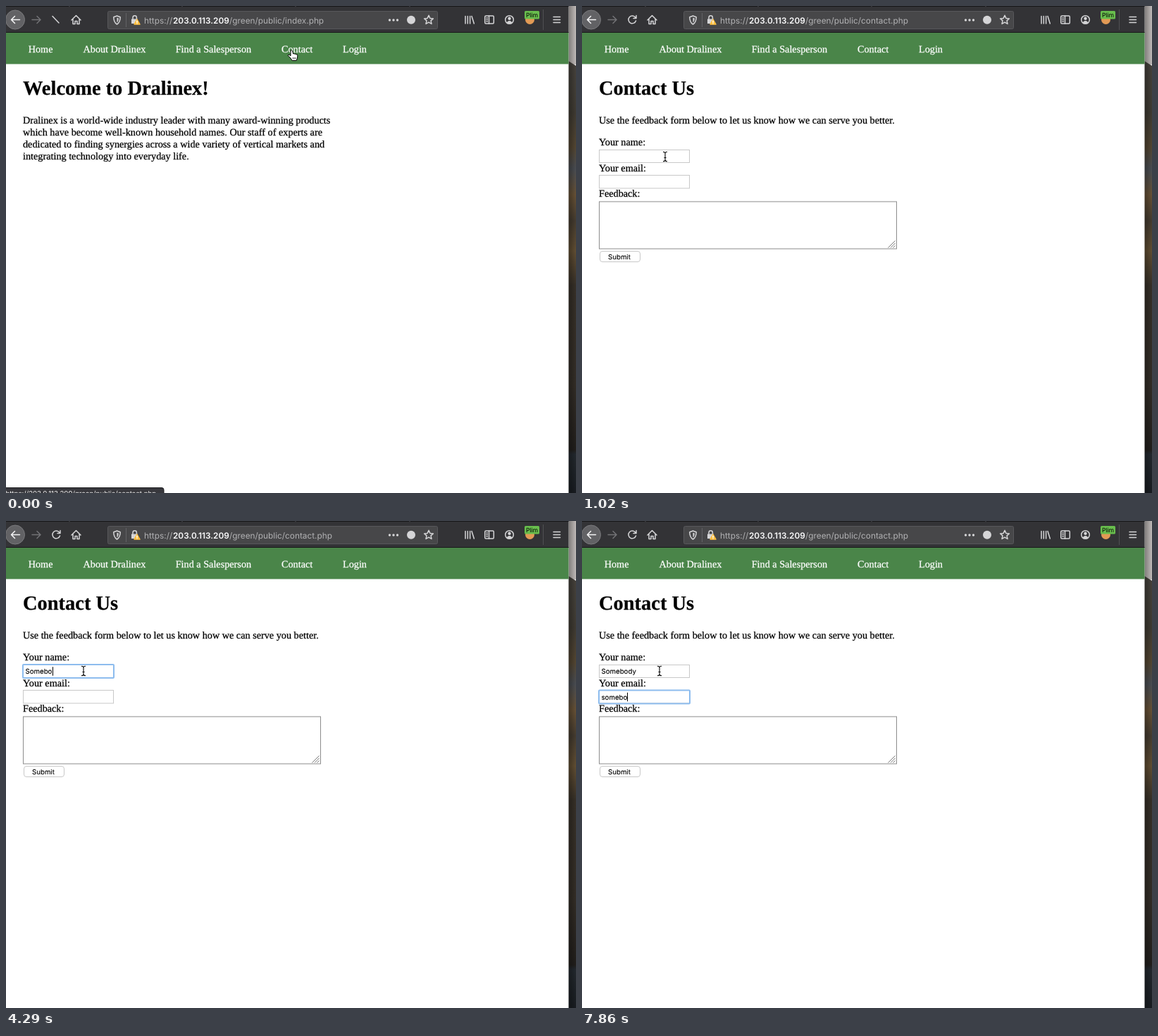
These frames come from a looping animation (809x692 px, 8000 ms). An HTML page:

```html
<!DOCTYPE html>
<html lang="en">
<head>
<meta charset="utf-8">
<title>Contact form</title>
<style>
  html, body { margin: 0; width: 100%; height: 100%; overflow: hidden; background: #fff; }
  svg { display: block; }
  text { text-rendering: geometricPrecision; white-space: pre; }
  .page { font: 14.22px "Liberation Serif", serif; }
  .page text { stroke: currentColor; stroke-width: .25; }
  .title { font: bold 28.44px "Liberation Serif", serif; }
  .page .field { font: 9.7px Inter, sans-serif; stroke-width: .1; }
  .nav { color: #fff; fill: #fff; }
  .url { font: 11.83px Inter, sans-serif; fill: #b1b1b3; }
  .host { font-weight: 600; fill: #f9f9fa; }
  .status { font: 9.65px Inter, sans-serif; fill: #f0f0f0; }
  .icon { fill: none; stroke: #d5d5d7; stroke-width: 1.5; stroke-linecap: round; stroke-linejoin: round; }
  .box { fill: #fff; stroke: #c8c8c8; }
</style>
</head>
<body>
<svg width="809" height="692" viewBox="0 0 809 692">
  <defs>
    <linearGradient id="rocks" x2="0" y2="1">
      <stop offset="0" stop-color="#4c4842"/>
      <stop offset=".12" stop-color="#454037"/>
      <stop offset=".2" stop-color="#5b4c36"/>
      <stop offset=".25" stop-color="#50545a"/>
      <stop offset=".31" stop-color="#70583a"/>
      <stop offset=".37" stop-color="#4b4134"/>
      <stop offset=".44" stop-color="#6a5537"/>
      <stop offset=".52" stop-color="#3b342b"/>
      <stop offset=".75" stop-color="#37312a"/>
      <stop offset=".9" stop-color="#24211e"/>
      <stop offset=".91" stop-color="#262c32"/>
      <stop offset="1" stop-color="#1b1f24"/>
    </linearGradient>
    <linearGradient id="shade">
      <stop offset="0" stop-opacity=".4"/>
      <stop offset="1" stop-opacity=".08"/>
    </linearGradient>
  </defs>

  <!-- Desktop scenery beside the window -->
  <rect x="798" width="11" height="83" fill="#cfc9c7"/>
  <path d="M798 78L809 85V692H798z" fill="url(#rocks)"/>
  <rect x="798" width="11" height="692" fill="url(#shade)"/>
  <rect width="798.5" height="692" fill="#fff"/>

  <!-- Browser toolbar -->
  <rect width="798.5" height="38" fill="#333336"/>
  <rect width="798.5" height="1" fill="#161618"/>
  <path d="M90 0v1M250 0v1M411 0v1M573 0v1" stroke="#55555a"/>
  <rect y="37" width="798.5" height="1" fill="#18181a"/>
  <circle cx="13" cy="19.5" r="13.5" fill="#626265" stroke="#7b7b7e"/>
  <g class="icon">
    <path d="M19.5 19.5H7.5M12.5 14.5l-5 5 5 5" stroke="#f4f4f5"/>
    <path d="M37 19.5H49M44 14.5l5 5-5 5" stroke="#737376"/>
    <path id="stop" d="M66 14.5L75 24"/>
    <path id="reload" d="M75.8 16.3A5.4 5.4 0 1 0 76.5 21M77 13.5V17.5H73"/>
    <path d="M93 20l6.5-6.5 6.5 6.5M95 19v6.5h3V21.5h3v4h3V19"/>
  </g>
  <rect x="144.5" y="7.5" width="468" height="25" rx="2" fill="#474749" stroke="#58585b"/>
  <path d="M170.5 10v20" stroke="#626265"/>
  <g class="icon">
    <path d="M157.5 14l4.7 1.7c0 5-1 8-4.7 10.3-3.7-2.3-4.7-5.3-4.7-10.3z"/>
    <path d="M157.5 16.5v7c1.6-1.4 2.2-3 2.3-6z" fill="#d5d5d7" stroke="none"/>
    <path d="M180 18.5v-2a2.7 2.7 0 0 1 5.4 0v2"/>
    <path d="M178 18.5h8.5v6.5h-8.5z" fill="#d5d5d7" stroke="none"/>
    <path d="M186 19l4 7h-8z" fill="#ffbf3f" stroke="#ffbf3f"/>
    <path d="M186 21.2v2M186 25v.1" stroke="#fff"/>
    <path d="M600 13.3l1.9 4.1 4.5.5-3.4 3 1 4.5-4-2.3-4 2.3 1-4.5-3.4-3 4.5-.5z"/>
    <path d="M652 14.5v10.5M655.3 14.5v10.5M658.6 14.5v10.5M661 14.5l3.3 10.5"/>
    <rect x="679.7" y="14" width="12.6" height="11" rx="1.5"/>
    <path d="M685.5 14v11M682 17h1.3M682 19.5h1.3M682 22h1.3"/>
    <circle cx="714.5" cy="19.5" r="5.8"/>
    <circle cx="714.5" cy="17.7" r="2.2" fill="#d5d5d7" stroke="none"/>
    <path d="M710.7 23.2q3.8-4.2 7.6 0-3.8 3.4-7.6 0z" fill="#d5d5d7" stroke="none"/>
    <path d="M777 15.5h9.5M777 19.5h9.5M777 23.5h9.5"/>
  </g>
  <g fill="#d5d5d7">
    <circle cx="544.5" cy="20" r="1.7"/><circle cx="550" cy="20" r="1.7"/><circle cx="555.5" cy="20" r="1.7"/>
    <circle cx="575" cy="19.7" r="6"/>
  </g>
  <circle cx="743.5" cy="19.5" r="6.5" fill="#e29a55"/>
  <rect x="736" y="7" width="21" height="11.5" rx="1.5" fill="#68bd4d"/>
  <text x="746.5" y="16" text-anchor="middle" style="font:8.6px Inter,sans-serif">Plim</text>
  <path d="M762.5 5v29" stroke="#505053"/>
  <text class="url" x="196" y="24.5">https://</text>
  <text class="url host" x="237" y="24.5">203.0.113.209</text>
  <text class="url" id="path" x="317" y="24.5"></text>

  <!-- Site navigation -->
  <rect y="38" width="798.5" height="44.5" fill="#4a8549"/>
  <g class="page nav">
    <text x="31.7" y="65.6">Home</text>
    <text x="109.5" y="65.6">About Dralinex</text>
    <text x="240.7" y="65.6">Find a Salesperson</text>
    <text x="391" y="65.6">Contact</text>
    <text x="478" y="65.6">Login</text>
  </g>

  <g id="welcome" class="page">
    <text class="title" x="24" y="126">Welcome to Dralinex!</text>
    <text x="24" y="167.3">Dralinex is a world-wide industry leader with many award-winning products</text>
    <text x="24" y="184.3">which have become well-known household names. Our staff of experts are</text>
    <text x="24" y="201.3">dedicated to finding synergies across a wide variety of vertical markets and</text>
    <text x="24" y="218.3">integrating technology into everyday life.</text>
  </g>

  <g id="contact" class="page">
    <text class="title" x="24" y="126">Contact Us</text>
    <text x="24" y="167.3">Use the feedback form below to let us know how we can serve you better.</text>
    <text x="24" y="198">Your name:</text>
    <text x="24" y="234.5">Your email:</text>
    <text x="24" y="271">Feedback:</text>
    <rect class="box" x="24.5" y="204.5" width="128" height="18"/>
    <rect class="box" x="24.5" y="240.5" width="128" height="18.5"/>
    <rect x="24.5" y="278" width="422" height="67" fill="#fff" stroke="#8c8c8c"/>
    <path d="M434.5 343.5l10-10M438 343.5l6.5-6.5M441.5 343.5l3-3" stroke="#777"/>
    <rect class="box" x="25.5" y="348.5" width="57" height="15" rx="3.5"/>
    <text class="field" x="37" y="359.5">Submit</text>
    <rect id="ring" x="24" width="129" height="19" rx="1" fill="none" stroke="#8dbcee" stroke-width="2"/>
    <text class="field" id="name" x="27.5" y="217"></text>
    <text class="field" id="email" x="27.5" y="253.5"></text>
    <rect id="caret" width="1" height="12.5"/>
  </g>

  <g id="status">
    <path d="M-1 693V684.5H221q3 0 3 3V693z" fill="#38383d" stroke="#1c1c1e"/>
    <text class="status" x="-.5" y="696">https://203.0.113.209/green/public/contact.php</text>
  </g>

  <g id="hand">
    <path d="M0 1.5q1.5-1.5 2.6.3l1 4.2q1.3-1 2.2.3 1.5-.9 2.2.6 1.6-.5 1.8 1.6l-.3 3.5-1.3 3.5H2.2L-.5 11.5-4 8.4q.2-1.8 2.2-.9l1.8 1.3z"
      fill="#fff" stroke="#000" stroke-linejoin="round"/>
    <path d="M3.3 11v2.5M5.2 11v2.5M7 11v2.5" stroke="#000" stroke-width=".7"/>
  </g>
  <path id="arrow" d="M0 0V12.3l2.8-2.6 2.1 5 2-.9-2.1-4.8h3.9z" stroke="#fff" stroke-width=".9"/>
  <path id="beam" d="M-3-6.8Q0-6.8 0-4.8 0-6.8 3-6.8M0-5V5M-3 6.8Q0 6.8 0 4.8 0 6.8 3 6.8M-1.5 1.5h3"
    fill="none" stroke="#000" stroke-width="1.1"/>
</svg>
<script>
  const LOOP = 8000;
  const el = id => document.getElementById(id);
  const show = (id, on) => el(id).style.display = on ? '' : 'none';

  // Each track lists [start time, ...values]; a value holds until the next start.
  const pointer = [
    [0, 'hand', 404, 62], [150, 'arrow', 405, 62], [290, 'hand', 404, 62],
    [440, 'hand', 400, 65], [580, 'arrow', 330, 133], [730, 'arrow', 224, 247],
    [880, 'arrow', 164, 230], [1020, 'beam', 118, 214], [1170, 'beam', 110, 213]
  ];
  const typedName = [[0, 0], [3110, 1], [3260, 2], [3700, 3], [3850, 4], [3990, 5], [4290, 6], [4440, 7], [4580, 8]];
  const typedEmail = [[0, 0], [6830, 1], [6980, 2], [7120, 3], [7270, 4], [7570, 5], [7720, 6]];
  const caretOn = [[0, false], [1320, true], [2060, false], [2660, true], [5480, false], [6080, true], [6680, false], [6830, true]];
  const ringOpacity = [[0, 0], [1320, .55], [1460, 1], [4730, .55], [4880, 1]];

  const at = (track, t) => track.findLast(([start]) => start <= t).slice(1);

  function draw(t) {
    const loaded = t >= 150;
    show('welcome', !loaded);
    show('contact', loaded);
    show('stop', !loaded);
    show('reload', loaded);
    el('reload').style.stroke = t < 880 ? '#737376' : '#d5d5d7';
    el('path').textContent = `/green/public/${loaded ? 'contact' : 'index'}.php`;
    show('status', !loaded || (t >= 290 && t < 880));

    const [shape, x, y] = at(pointer, t);
    for (const id of ['hand', 'arrow', 'beam']) show(id, id === shape);
    el(shape).setAttribute('transform', `translate(${x} ${y})`);

    el('name').textContent = 'Somebody'.slice(0, at(typedName, t)[0]);
    el('email').textContent = 'somebody'.slice(0, at(typedEmail, t)[0]);

    const inEmail = t >= 4730;
    const active = el(inEmail ? 'email' : 'name');
    el('ring').setAttribute('y', inEmail ? 240.5 : 204);
    el('ring').setAttribute('opacity', at(ringOpacity, t)[0]);
    show('caret', at(caretOn, t)[0]);
    const width = active.textContent ? active.getComputedTextLength() : 0;
    el('caret').setAttribute('x', Math.round(27.7 + width));
    el('caret').setAttribute('y', inEmail ? 243.8 : 207.3);
  }

  const begin = performance.now();
  function tick() {
    draw((performance.now() - begin) % LOOP);
    requestAnimationFrame(tick);
  }
  tick();
</script>
</body>
</html>
```
